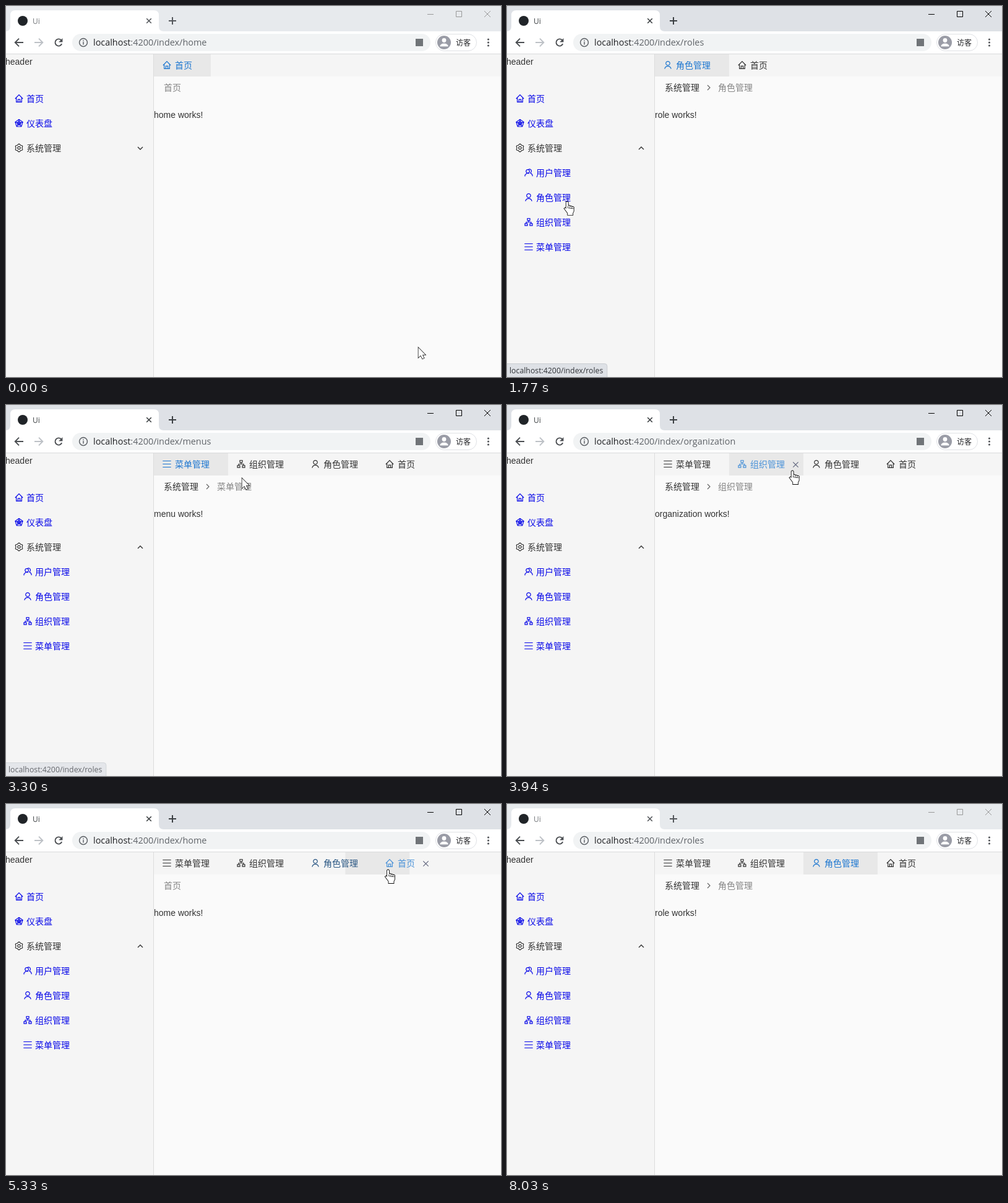
These frames come from a looping animation (800 px wide and 600 px high, 8.19 s). An HTML page with a canvas:

```html
<!DOCTYPE html>
<html lang="zh-CN">
<head>
<meta charset="utf-8">
<title>Ui</title>
<style>
html, body { margin: 0; width: 100%; height: 100%; overflow: hidden; }
canvas { display: block; }
</style>
</head>
<body>
<canvas id="stage" width="800" height="600"></canvas>
<script>
const ctx = document.getElementById('stage').getContext('2d');
const LOOP = 8190, OPEN_AT = 560, BLUR_AT = 8030, LEAVE_AT = 6630;
const CJK = '"Noto Sans CJK SC", "Noto Sans CJK", sans-serif';
const UI = '"Open Sans", "Noto Sans", sans-serif';
const BODY = '"Liberation Sans", Arial, sans-serif';
const INK = '#333', LINK = '#0808e8', GREY = '#4b4e52';

// A closed polygon around a centre; lobes make its radius swing.
function ring(cx, cy, radius, corners = 24, lobes = 0) {
  const points = Array.from({ length: corners }, (_, i) => {
    const angle = 2 * Math.PI * i / corners, r = radius + 0.7 * (lobes && Math.cos(lobes * angle));
    return [cx + r * Math.sin(angle), cy - r * Math.cos(angle)].map(v => v.toFixed(2)).join(' ');
  });
  return `M${points.join('L')}Z`;
}
const box = (x, y) => `M${x} ${y}h4v3.4h-4Z`;

// Icons live in a 14 x 14 box.
const icons = {
  home: 'M.8 7.5 7 1.2 13.2 7.5M2.7 6.2V12.8H11.3V6.2M5.4 12.6V8.6H8.6V12.6',
  radar: ring(7, 7.3, 6.4, 5) + ring(7, 7.3, 3.3, 5) + 'M7 1V7.3L3.2 12.5M7 7.3 10.8 12.5M1 5.4 7 7.3 13 5.4',
  gear: ring(7, 7, 5.7, 48, 6) + ring(7, 7, 2.2),
  users: ring(5.6, 4.8, 2.8) + 'M7 1.6A3 3 0 1 1 9.6 7.4M.9 13A4.8 4.8 0 0 1 8 8.5M9.6 7.6A5.4 5.4 0 0 1 13.2 12.8',
  user: ring(7, 4.2, 3.2) + 'M1.8 13.2A5.3 5.3 0 0 1 12.2 13.2',
  org: box(5, 1) + box(1, 9.3) + box(9, 9.3) + 'M7 4.4V7M3 9.3V7H11V9.3',
  menu: [2, 7, 12].map(y => `M.3 ${y}H13.7`).join('')
};
const pages = {
  home: { label: '首页', icon: 'home', body: 'home works!', width: 92 },
  roles: { label: '角色管理', icon: 'user', body: 'role works!', width: 120 },
  organization: { label: '组织管理', icon: 'org', body: 'organization works!', width: 120 },
  menus: { label: '菜单管理', icon: 'menu', body: 'menu works!', width: 120 }
};
const submenu = ['users', 'roles', 'organization', 'menus'];

// The pointer's tour: arrival time, spot, and the page its click opens.
const row = i => ({ x: 103 - 5 * i, y: 268 + 38 * i });
const tabSpot = i => ({ x: 359 + 86 * i, y: 106 });
const tour = [
  [0, { x: 666, y: 552 }], [540, row(-1)], [1200, row(0)], [1500, row(1), 'roles'],
  [2080, row(2)], [2230, row(2), 'organization'], [2380, row(3)], [2740, row(3), 'menus'],
  [3300, { x: 381, y: 118 }], [3600, tabSpot(1), 'organization'], [4415, tabSpot(2), 'roles'],
  [5247, tabSpot(3), 'home'], [5750, tabSpot(-1)], [6160, tabSpot(2), 'roles'],
  [LEAVE_AT, { x: 728, y: 566 }]
];
const visits = [[-LOOP, null, 'home'], ...tour.filter(stop => stop[2])];

const clamp = v => Math.max(0, Math.min(1, v));
const easeOut = v => 1 - (1 - clamp(v)) ** 2;
const mix = (a, b, k) => a + (b - a) * k;
const latest = (list, t) => list.filter(item => item[0] <= t).pop();
const pageAt = t => latest(visits, t)[2];

function tabsAt(t) {
  const names = [];
  for (const [at, , name] of visits) if (at <= t && !names.includes(name)) names.unshift(name);
  let x = 239;
  return names.map(name => {
    const tab = { name, x, width: pages[name].width };
    x += tab.width;
    return tab;
  });
}

// The pointer lingers for a fifth of each leg, then glides on.
function pointerAt(t) {
  const i = tour.findIndex(stop => stop[0] > t);
  if (i < 1) return tour[i < 0 ? tour.length - 1 : 0][1];
  const [start, a] = tour[i - 1], [end, b] = tour[i];
  const u = clamp(((t - start) / (end - start) - 0.2) / 0.8), k = u * u * (3 - 2 * u);
  return { x: mix(a.x, b.x, k), y: mix(a.y, b.y, k) };
}

function hoveredTab(t) {
  const p = pointerAt(t);
  return p.y < 78 || p.y >= 114 ? undefined :
    tabsAt(t).find(tab => p.x >= tab.x && p.x < tab.x + tab.width);
}

function hoveredLink(t) {
  const p = pointerAt(t);
  const name = submenu[Math.round((p.y - 270) / 40)];
  return t >= OPEN_AT && p.x < 238 && pages[name] ? name : undefined;
}

// Averaging the recent states gives the colour transition.
function tabColor(name, t) {
  const sum = [0, 0, 0], samples = 6;
  for (let i = 0; i < samples; i++) {
    const past = t - i * 30, hover = hoveredTab(past);
    const rgb = hover && hover.name === name ? [74, 146, 216] :
      pageAt(past) === name ? [28, 118, 208] : [51, 51, 51];
    rgb.forEach((v, c) => sum[c] += v / samples);
  }
  return `rgb(${sum.map(Math.round)})`;
}

function text(str, x, y, color = INK, size = 14, family = CJK) {
  ctx.font = `${size}px ${family}`;
  ctx.fillStyle = color;
  ctx.fillText(str, x, y);
  return x + ctx.measureText(str).width;
}
function rect(x, y, w, h, color) {
  ctx.fillStyle = color;
  ctx.fillRect(x, y, w, h);
}
function round(x, y, w, h, radius, color, border) {
  ctx.beginPath();
  ctx.roundRect(x, y, w, h, radius);
  ctx.fillStyle = color;
  ctx.fill();
  if (!border) return;
  ctx.strokeStyle = border;
  ctx.lineWidth = 1;
  ctx.stroke();
}
const disc = (x, y, r, color) => round(x - r, y - r, 2 * r, 2 * r, r, color);

// The fill lies over the inner half of the stroke.
function path(d, x, y, color, width = 1.2, fill) {
  const shape = new Path2D(d);
  ctx.save();
  ctx.translate(x, y);
  ctx.strokeStyle = color;
  ctx.lineWidth = width;
  ctx.stroke(shape);
  if (fill) { ctx.fillStyle = fill; ctx.fill(shape); }
  ctx.restore();
}
function entry(icon, label, x, y, color, gap = 19) {
  path(icons[icon], x, y - 7.5, color);
  text(label, x + gap, y + 5, color);
}
const cross = (x, y, r, color, width) =>
  path(`M${-r} ${-r}L${r} ${r}M${r} ${-r}L${-r} ${r}`, x, y, color, width);

function drawBrowser(t) {
  const active = t >= OPEN_AT && t < BLUR_AT;
  const control = active ? '#000' : '#999', mark = active ? '#3c4043' : '#55585c';
  rect(0, 0, 800, 41, active ? '#dee1e6' : '#e7eaed');
  rect(0, 41, 800, 36, '#fff');
  rect(0, 77, 800, 1, '#d9dadc');
  path('M-1 41Q7 41 7 33V15Q7 7 15 7H239Q247 7 247 15V33Q247 41 255 41Z', 0, 0, 'transparent', 1, '#fff');
  disc(27, 24, 8, '#202428');
  text('Ui', 43, 28.5, active ? '#3c4043' : '#74777b', 12, UI);
  cross(231, 24, 3.8, mark, 1.6);
  path('M-6 0H6M0 -6V6', 269, 24, mark, 2);
  path('M681 13.5H691M727.5 8.5H736.5V17.5H727.5Z', 0, 0, control, 1);
  cross(778, 13, 5, control, 1);

  path('M7 0H-6M0 -6.3 -6.3 0 0 6.3', 21, 59, GREY, 1.9);
  path('M-7 0H6M0 -6.3 6.3 0 0 6.3', 53, 59, '#bdc1c6', 1.9);
  path('M5.2 2.2A5.6 5.6 0 1 1 4 -4', 85, 59, GREY, 1.9);
  path('M6.2 -6.5V-.8H.5Z', 85, 59, GREY, .4, GREY);
  round(107, 45, 579, 28, 14, '#f1f3f4');
  path(ring(0, 0, 6.4) + 'M0 -1V3.5M0 -3.6V-2', 125, 59, '#5f6368', 1.5);
  const end = text('localhost', 141, 64, '#202124', 14.42, UI);
  text(':4200/index/' + pageAt(t), end, 64, '#5f6368', 14.42, UI);
  rect(662, 53, 12, 12, '#707478');

  round(694.5, 45.5, 66, 27, 13.5, '#fff', '#dfe1e5');
  disc(708, 59, 11, '#9a9ca6');
  disc(708, 55.5, 3.4, '#fff');
  path('M-6.5 6.2Q-6 1.7 0 1.7T6.5 6.2Z', 708, 59, '#fff', .3, '#fff');
  text('访客', 727, 63.5, '#202124', 12);
  for (const y of [54, 59, 64]) disc(779.5, y, 1.6, '#55585c');
}

function drawSidebar(t) {
  rect(0, 78, 238, 522, '#f5f5f5');
  rect(238, 78, 1, 522, '#dcdcdc');
  text('header', -1, 95, INK, 14, BODY);
  entry('home', '首页', 14, 150, LINK);
  entry('radar', '仪表盘', 14, 190, LINK);
  entry('gear', '系统管理', 14, 230, INK);
  const open = easeOut((t - OPEN_AT) / 220), tip = mix(2, -2, open);
  path(`M-4 ${-tip}L0 ${tip}L4 ${-tip}`, 217, 230, INK, 1.4);
  ctx.save();
  ctx.beginPath();
  ctx.rect(0, 250, 238, 160 * open);
  ctx.clip();
  submenu.forEach((name, i) => {
    const { icon, label } = pages[name] || { icon: 'users', label: '用户管理' };
    entry(icon, label, 28, 270 + 40 * i, LINK);
  });
  ctx.restore();
}

function drawMain(t) {
  const page = pageAt(t), tabs = tabsAt(t), start = latest(visits, t)[0];
  rect(239, 78, 561, 522, '#fafafa');
  rect(239, 78, 561, 36, '#f5f5f5');
  const target = tabs.find(tab => tab.name === page);
  const from = tabsAt(start - 1).find(tab => tab.name === pageAt(start - 1)) || target;
  const k = easeOut((t - start) / 240);
  rect(mix(from.x, target.x, k), 78, mix(from.width, target.width, k), 36, '#e8e8e8');
  const hover = hoveredTab(t);
  for (const { name, x, width } of tabs) {
    entry(pages[name].icon, pages[name].label, x + 14, 96, tabColor(name, t), 20);
    if (hover && hover.name === name) cross(x + width - 12.5, 96.5, 4.2, '#5a5f78', 1.1);
  }
  let x = 255;
  if (page !== 'home') {
    text('系统管理', x, 137);
    path('M-2 -4 2 0 -2 4', 326, 132, '#666', 1.2);
    x = 341;
  }
  text(pages[page].label, x, 137, '#858585');
  text(pages[page].body, 239, 181, INK, 14, BODY);
}

// The address of the last hovered link stays a while, then fades.
function drawHint(t) {
  let age = 0;
  while (age < 600 && !hoveredLink(t - age)) age += 20;
  if (age >= 600) return;
  const label = 'localhost:4200/index/' + hoveredLink(t - age);
  ctx.font = `12.3px ${UI}`;
  const width = ctx.measureText(label).width + 11;
  ctx.globalAlpha = clamp((600 - age) / 450);
  round(-.5, 578.5, width, 23, [0, 4, 0, 0], '#dee1e6', '#c9ccd1');
  text(label, 4, 594, '#303338', 12.3, UI);
  ctx.globalAlpha = 1;
}

function drawPointer(t) {
  if (t >= LEAVE_AT) return;
  const { x, y } = pointerAt(t);
  const overMenu = x < 238 && y > 130 && y < 410;
  if (overMenu || hoveredTab(t)) {
    const fingers = [0, 1, 2].map(i => `M${7 + 3 * i} 13V${8.5 + i}q1.5 -1.4 3 0V13Z`).join('');
    path('M4 13V2.5q1.5 -2 3 0V13ZM4 13 2.5 11.5 1 12.5 6.5 20V23H14.5V20L16 17V12Z' + fingers,
      x - 5, y - 1, '#111', 1.8, '#fff');
    path('M7 9V12M10 9.5V12M13 10.5V12', x - 5, y - 1, '#111', 1);
  } else {
    path('M.5 .5V16.5L4.2 13 7 18.6 9.6 17.4 7 12H11.7Z', x, y, '#111', 1.5, '#fff');
  }
}

function frame(t) {
  drawBrowser(t);
  drawSidebar(t);
  drawMain(t);
  drawHint(t);
  drawPointer(t);
  requestAnimationFrame(now => frame(Math.max(0, now - origin) % LOOP));
}
const origin = performance.now();
frame(0);
</script>
</body>
</html>
```
